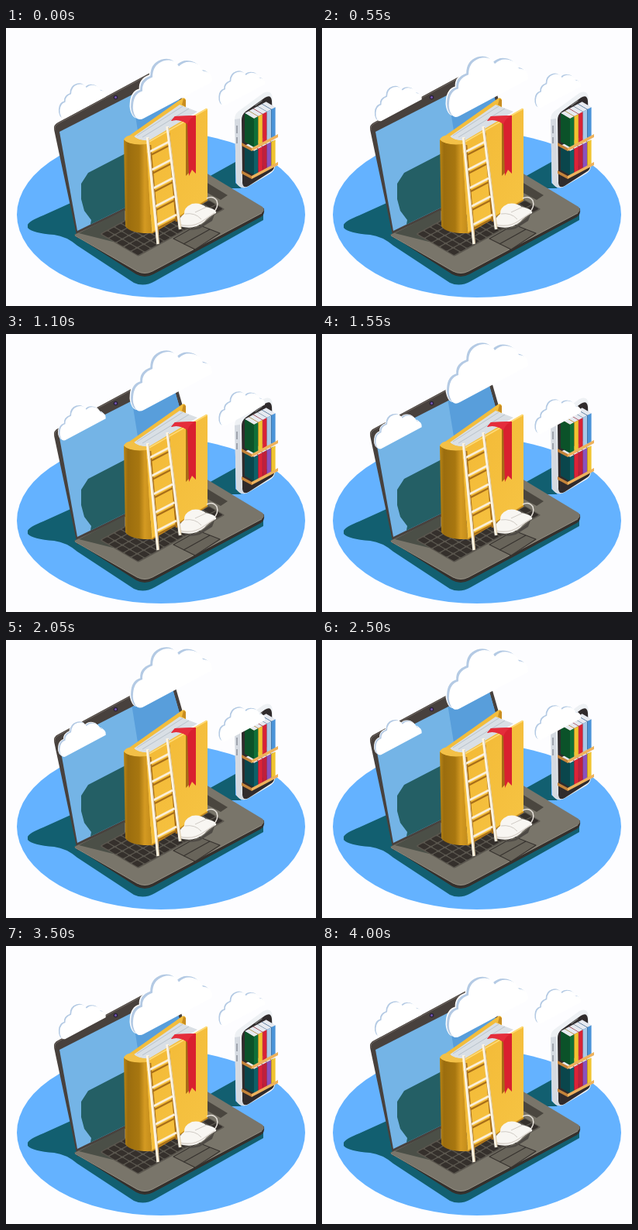
An HTML page for the animation above (4050 ms loop, 400 by 359 pixels).

```html
<!DOCTYPE html>
<html lang="en">
<head>
<meta charset="utf-8">
<title>Online library</title>
<style>
html, body { margin: 0; width: 100%; height: 100%; overflow: hidden; background: #fdfdff; }
svg { display: block; width: 100%; height: 100%; }
</style>
</head>
<body>
<svg viewBox="0 0 400 359">
  <defs>
    <path id="puff" d="M3 73Q-1 66 0 58Q1 43 12 40Q11 27 25 22Q25 6 39 1Q53 -3 59 8Q67 0 78 3Q87 5 90 14Q103 15 102 28L14 75Q7 79 3 73Z"/>
    <g id="cloud">
      <use href="#puff" fill="#fff" stroke="#fff" stroke-width="1.500"/>
      <use href="#puff" fill="#b4cae4" x=".7" y=".7"/>
      <use href="#puff" fill="#fff" x="3.500" y="2.500"/>
    </g>
    <linearGradient id="cover" x2="1" y2="1">
      <stop stop-color="#f3b935"/><stop offset="1" stop-color="#f6c444"/>
    </linearGradient>
    <linearGradient id="spine">
      <stop stop-color="#b98516"/><stop offset=".15" stop-color="#9b6d0e"/>
      <stop offset=".55" stop-color="#a87710"/><stop offset=".75" stop-color="#d49a22"/>
      <stop offset="1" stop-color="#c48c1a"/>
    </linearGradient>
    <clipPath id="screen"><path d="M69 134L214 60L250 185L92 262Z"/></clipPath>
  </defs>

  <ellipse cx="200" cy="241" rx="186" ry="107" fill="#64b2ff"/>

  <g id="shadows" fill="#125f70">
    <path d="M28 254Q30 249 48 242L90 223L94 263L178 312L332 237V248L192 327Q178 335 165 329L92 281Q78 269 62 267Q34 265 28 258Z"/>
    <path d="M260 193L296 173V200L304 207L290 207L262 197Z"/>
  </g>

  <g id="lid">
    <path d="M62 131Q61 125 67 122L206 47Q214 43 217 55L256 190L92 272Z" fill="#48413d"/>
    <path d="M63 132Q62 126 68 123L206 48.500Q213 45 216 56" fill="none" stroke="#716963"/>
    <g clip-path="url(#screen)">
      <path d="M60 50H260V270H60Z" fill="#74b4e6"/>
      <path d="M160 70L260 20V270H192Z" fill="#589edb"/>
      <path d="M97 201L106 187L160 159V270H106L110 248L101 236L97 221Z" fill="#245f65"/>
    </g>
    <circle cx="141.500" cy="89.500" r="2.800" fill="#29223b"/>
    <circle cx="141.500" cy="89.500" r="1.500" fill="#7554b3"/>
  </g>

  <g id="base">
    <path d="M88 267L168 318Q179 324 190 318L329 244Q334 241 333 233L300 225Z" fill="#35302c"/>
    <path d="M88 267L258 187L331 231Q335 235 330 239L189 314Q179 319 169 314Z" fill="#79756a"/>
    <path d="M89 268L169 314Q179 319 189 314L330 239" fill="none" stroke="#948f83"/>
    <path d="M94 265L153 235V262L138 276Z" fill="#4b4f47"/>
    <path d="M258 199L286 216L277 222L258 212Z" fill="#4a463f"/>
    <g id="keys" transform="matrix(.86 -.47 .86 .5 121 266)">
      <rect width="130" height="58" rx="2" fill="#5b574f"/>
    </g>
    <g fill="#68645a" stroke="#37332f" stroke-width="1.200" stroke-linejoin="round">
      <path d="M216 272L248 254L276 265L244 286Z"/>
      <path d="M229 279L263 260" fill="none"/>
    </g>
  </g>

  <g id="book">
    <path d="M152 144L227 91Q231 89 232 93V215L160 256Z" fill="#f3bd3c"/>
    <path d="M165 140L224 99L247 108L185 145Q170 146 165 140Z" fill="#d9dfe5"/>
    <path d="M169 139L228 101M176 141L236 104" stroke="#b9c3cc"/>
    <path d="M229 91L232 93V102L227 99Z" fill="#c98d20"/>
    <path d="M152 144Q157 151 181 149L188 265Q161 266 154 256Z" fill="url(#spine)"/>
    <path d="M152 144Q155 138 164 139Q171 146 184 146L181 150Q159 152 152 144Z" fill="#f3c047"/>
    <path d="M181 148L258 104Q260 103 260 107V222L188 265Z" fill="url(#cover)"/>
    <path d="M181 149L259 104.500" stroke="#ffdb77" stroke-width="1.500"/>
    <path d="M188 265L260 222" stroke="#c68a1d" stroke-width="1.500"/>
    <path d="M232 120L236 119V187L232 191Z" fill="#a76b16"/>
    <path d="M213 120L218 114L245 113V188L240 183L236 191L234 124Q224 117 213 120Z" fill="#d9202f"/>
    <path d="M213 120L218 114L245 113Q237 116 234 124Q224 117 213 120Z" fill="#e52d3b"/>
  </g>

  <g id="mouse" fill="#f8f6f2">
    <path d="M267 239Q275 231 272 223Q267 216 259 220" fill="none" stroke="#e8e3dc" stroke-width="1.500"/>
    <path d="M224 254Q236 263 250 256L269 241L266 249L250 259Q233 264 224 254Z" fill="#4e4a45"/>
    <path d="M222 253Q222 246 230 240Q229 232 240 227Q250 225 258 231Q272 234 271 239Q262 243 256 250Q244 260 229 257Q222 256 222 253Z"/>
    <path d="M231 240Q244 238 252 247M244 238L259 231" fill="none" stroke="#cfcac4"/>
    <path d="M224 254Q242 258 254 249L269 239" fill="none" stroke="#d8d2cb" stroke-width="1.500"/>
  </g>

  <g id="ladder" fill="none"></g>

  <g id="phone">
    <path d="M295 118Q295 110 302 106L332 84Q343 79 344 91L347 178Q347 184 341 188L312 205Q303 209 297 200Z" fill="#eef1f4"/>
    <path d="M295 118L297 200Q302 207 308 206L304 198L302 117Z" fill="#d5dae1"/>
    <path d="M298 126v10M298 141v8" stroke="#8d939d" stroke-width="1.500"/>
    <path d="M304 119Q304 112 309 108L334 90Q342 85 343 94L346 179Q346 183 341 186L313 204Q306 208 305 200Z" fill="#302b2c"/>
    <path d="M322 100L330 94" stroke="#777" stroke-width="1.500" stroke-linecap="round"/>
    <g id="shelves"></g>
  </g>

  <use id="leftCloud" href="#cloud"/>
  <use id="bigCloud" href="#cloud"/>
  <use id="rightCloud" href="#cloud"/>
</svg>
<script>
const LOOP = 4050;
const byId = id => document.getElementById(id);

function add(parent, tag, attrs) {
  const node = document.createElementNS('http://www.w3.org/2000/svg', tag);
  for (const key in attrs) node.setAttribute(key, attrs[key]);
  return byId(parent).appendChild(node);
}

function line(parent, d, stroke, width) {
  add(parent, 'path', { d, stroke, 'stroke-width': width });
}

function drawKeys() {
  for (let row = 0; row < 5; row++)
    for (let col = 0; col < 13; col++)
      add('keys', 'rect', {
        x: 1.5 + col * 9.9, y: 1.5 + row * 11.2,
        width: 8.4, height: 9.6, rx: 1.5, fill: '#35302c'
      });
}

function drawLadder() {
  const rungs = [0, 1, 2, 3, 4].map(i => `M${183 + i * 2.5} ${161 + i * 23.5}l27 -14`).join('');
  add('ladder', 'path', {
    d: 'M184 147L194 262M208 131L218 246' + rungs,
    transform: 'translate(2 4)', stroke: '#a96f18', 'stroke-width': 2.5
  });
  line('ladder', rungs, '#fbefd9', 2.8);
  line('ladder', 'M182.5 141L196 279M208 127L224.5 260', '#fdf5e4', 3.4);
  line('ladder', 'M184 142L197.5 278M209.500 128L226 259', '#d8c5a3', 1);
}

// A box seen from its left end: pages on top, cover on the left, spine in front.
function drawBook(x, bottom, width, height, color) {
  const top = bottom - height, rise = width * .53;
  const face = (d, fill) => add('shelves', 'path', { d, fill });
  face(`M${x} ${top}l${width} ${-rise}l-12 -7l${-width} ${rise}Z`, '#e7eaf0');
  face(`M${x} ${top}l-12 -7v${height}l12 7Z`, color);
  face(`M${x} ${top}l-12 -7v${height}l12 7Z`, '#0004');
  face(`M${x} ${top}l${width} ${-rise}v${height}l${-width} ${rise}Z`, color);
}

function drawShelf(y) {
  add('shelves', 'path', { d: `M304 ${y}l13 7v4l-13 -7Z`, fill: '#c4833a' });
  add('shelves', 'path', { d: `M317 ${y + 7}l34 -18v4l-34 18Z`, fill: '#eeb25c' });
}

function drawShelves() {
  const rows = [
    [190, 31, ['#0e6068', '#dc2438', '#c01f3a', '#8951bd', '#f1c430']],
    [154, 37, ['#0f7038', '#f1c530', '#d92235', '#a9c9e8', '#4b94d8']]
  ];
  for (const [bottom, height, colors] of rows) {
    for (let i = colors.length - 1; i >= 0; i--)
      drawBook(320 + i * 5.6, bottom - i * 2.97, 5.2, height, colors[i]);
    drawShelf(bottom - 6);
  }
}

function ease(x) {
  return x < .5 ? .5 * (2 * x) ** 2.6 : 1 - .5 * (2 - 2 * x) ** 2.6;
}

function place(id, x, y, scale) {
  byId(id).setAttribute('transform', `translate(${x} ${y}) scale(${scale})`);
}

function render(now) {
  const phase = now % LOOP / LOOP * 2;
  const drift = ease(phase < 1 ? phase : 2 - phase);
  place('leftCloud', 67.5, 71 + 34 * drift, .58);
  place('bigCloud', 160.5, 39 - 30.5 * drift, 1);
  place('rightCloud', 274, 55 + 31 * drift, .57);
  requestAnimationFrame(render);
}

drawKeys();
drawLadder();
drawShelves();
render(performance.now());
</script>
</body>
</html>
```
